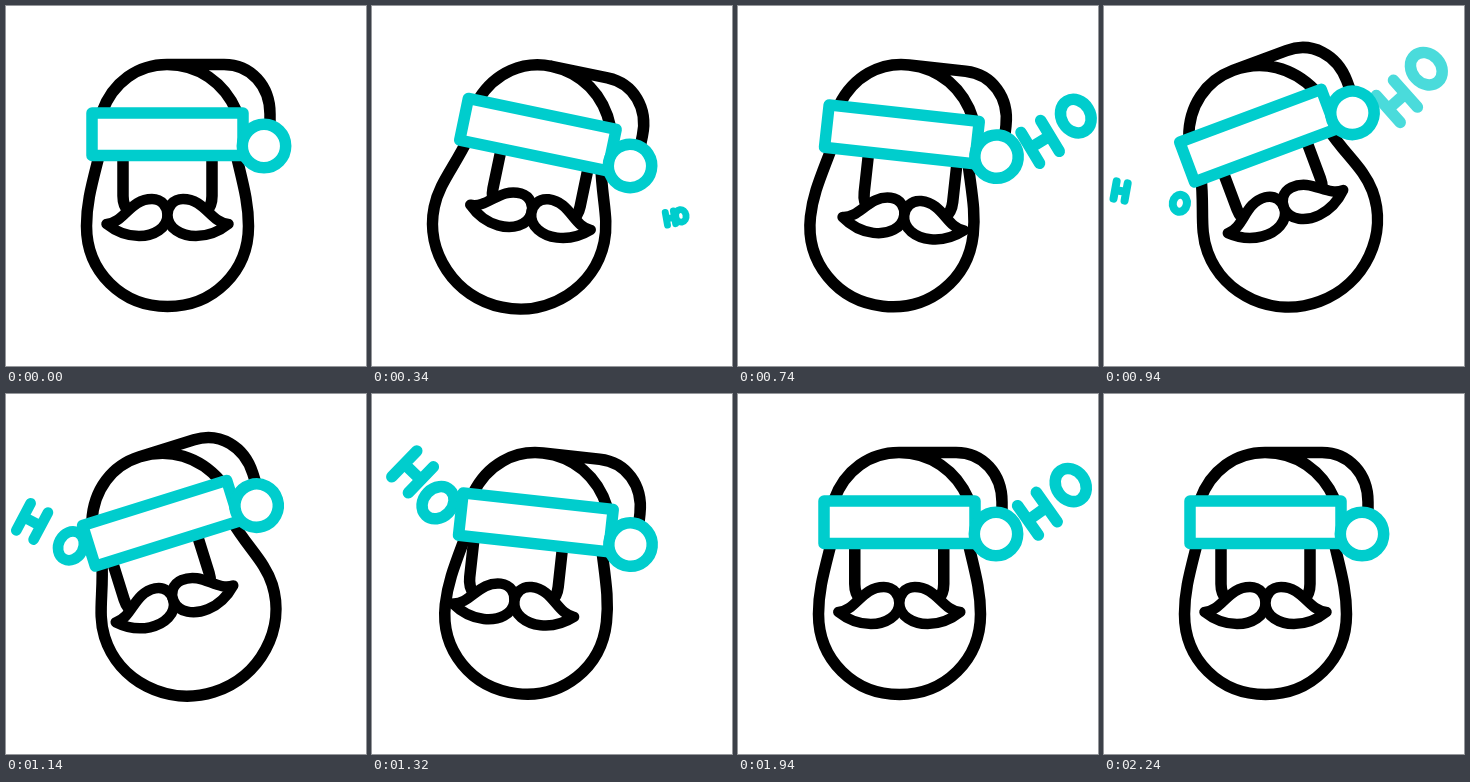
Write an HTML page with a canvas that moves like this. It is 360 by 360 pixels and loops after 2.4 s.

```html
<!DOCTYPE html>
<html lang="en">
<head>
<meta charset="utf-8">
<title>Ho ho ho</title>
<style>
  html, body { margin: 0; width: 100%; height: 100%; overflow: hidden; background: #fff; }
  canvas { display: block; width: 100vmin; height: 100vmin; }
</style>
</head>
<body>
<canvas id="stage" width="360" height="360"></canvas>
<script>
const ctx = document.getElementById('stage').getContext('2d');
const LOOP = 2400;
const LAUGH = 560, LAUGHS = 3, LAUGH_START = 200;
const WORD_START = 300, WORD_LIFE = 800;
const CYAN = '#00cdcd', BLACK = '#000', STROKE = 11.5;
const CENTER = 161.5, PIVOT_Y = 150;

const lerp = (a, b, u) => a + (b - a) * u;
const ease = u => (1 - Math.cos(Math.PI * u)) / 2;
const radians = degrees => degrees * Math.PI / 180;

// Eases from one turning point [time, value] to the next.
function swing(points, t) {
  const i = points.findIndex(([time]) => time > t);
  if (i < 0) return points[points.length - 1][1];
  const [t0, v0] = points[i - 1], [t1, v1] = points[i];
  return lerp(v0, v1, ease((t - t0) / (t1 - t0)));
}

const tilt = [[0, 0], [580, 18.5], [1030, -24.5], [1400, 10], [1660, 0]];
const faceShift = [[0, 0], [580, 15], [1250, -13], [2000, 0]];

// Each laugh puffs up the beard once.
function puff(t) {
  const u = (t - LAUGH_START) / LAUGH;
  return u < 0 || u > LAUGHS ? 0 : 0.1 * Math.abs(Math.sin(Math.PI * u));
}

// Words rise from one point to another along a bowed path while turning.
const rightWord = { x: [296, 294], y: [220, 44], bow: 27, angle: [-8, -50], gap: [-8, 44] };
const leftWord = { x: [51, 80], y: [212, 6], bow: -16, angle: [3, 74], gap: [80, 40] };

const glyphs = {
  H(s) {
    const path = new Path2D(), w = 11.5 * s, h = 18 * s;
    for (const x of [-w, w]) {
      path.moveTo(x, -h);
      path.lineTo(x, h);
    }
    path.moveTo(-w, 0);
    path.lineTo(w, 0);
    return path;
  },
  O(s) {
    const path = new Path2D();
    path.ellipse(0, 0, 14.5 * s, 17.5 * s, 0, 0, Math.PI * 2);
    return path;
  }
};

const crown = new Path2D('M96 106C107 76 132 58.5 161 58.5C192 58.5 218 76 231 106' +
  'M161 58.5H218C245 58.5 264 80 264 108V118');
const cheeks = new Path2D('M117 145V190Q117 200 123 206M206 145V190Q206 200 200 206');
const moustache = new Path2D('M100.5 218C118 217 124 193 146 193C156 193 161.5 201 161.5 209' +
  'C161.5 222 148 230 133 230C118 230 108 224 100.5 218Z');
const band = new Path2D('M86 107H237V149.5H86Z');
const pompon = new Path2D();
pompon.arc(258, 140, 21.7, 0, Math.PI * 2);

function outline(path, color, width = STROKE, filled = false) {
  if (filled) {
    ctx.fillStyle = '#fff';
    ctx.fill(path);
  }
  ctx.strokeStyle = color;
  ctx.lineWidth = width;
  ctx.stroke(path);
}

function turned(x, y, degrees, draw) {
  ctx.save();
  ctx.translate(x, y);
  ctx.rotate(radians(degrees));
  draw();
  ctx.restore();
}

function drawWord(word, t) {
  const p = t / WORD_LIFE;
  if (p <= 0 || p >= 1) return;
  const scale = Math.min(1, 2 * p) ** 0.45;
  const angle = lerp(...word.angle, p), heading = radians(angle * 1.15);
  const x = lerp(...word.x, p) + word.bow * Math.sin(Math.PI * p ** 0.8);
  const y = lerp(...word.y, p);
  const half = lerp(...word.gap, scale) / 2;
  ctx.globalAlpha = Math.min(1, (1 - p) / 0.28);
  for (const [letter, side] of [['H', -half], ['O', half]]) {
    turned(x + side * Math.cos(heading), y + side * Math.sin(heading), angle, () =>
      outline(glyphs[letter](scale), CYAN, STROKE * Math.sqrt(scale)));
  }
  ctx.globalAlpha = 1;
}

function drawBeard(swell) {
  const dx = 81 * swell, dy = 55 * swell;
  const left = 80.5 - dx, right = 242.5 + dx, bottom = 300.5 + dy;
  outline(new Path2D(`M94 146C86 178 ${left} 196 ${left} 220` +
    `C${left} 266 ${116 - dx / 2} ${bottom} ${CENTER} ${bottom}` +
    `C${207 + dx / 2} ${bottom} ${right} 266 ${right} 220C${right} 196 237 178 229.5 146`), BLACK);
}

function drawFace(shift, swell) {
  ctx.save();
  ctx.translate(shift * 1.2, 0);
  outline(cheeks, BLACK);
  ctx.restore();
  // The moustache lifts and its tips curl up with the laugh.
  for (const side of [1, -1]) {
    ctx.save();
    ctx.translate(CENTER + shift, 209 - swell * 35);
    ctx.scale(side, 1);
    ctx.rotate(radians(swell * 65));
    ctx.translate(-CENTER, -209);
    outline(moustache, BLACK, 10.5, true);
    ctx.restore();
  }
}

function drawHead(t) {
  const swell = puff(t);
  turned(CENTER, PIVOT_Y, swing(tilt, t), () => {
    ctx.translate(-CENTER, -PIVOT_Y);
    drawBeard(swell);
    drawFace(swing(faceShift, t), swell);
    outline(crown, BLACK);
    outline(band, CYAN, STROKE, true);
    outline(pompon, CYAN, STROKE, true);
  });
}

function render(t) {
  ctx.fillStyle = '#fff';
  ctx.fillRect(0, 0, 360, 360);
  ctx.lineCap = ctx.lineJoin = 'round';
  for (let i = 0; i < LAUGHS; i++) {
    drawWord(i % 2 ? leftWord : rightWord, t - WORD_START - i * LAUGH);
  }
  drawHead(t);
}

const start = performance.now();
function frame() {
  render((performance.now() - start) % LOOP);
  requestAnimationFrame(frame);
}
frame();
</script>
</body>
</html>
```
